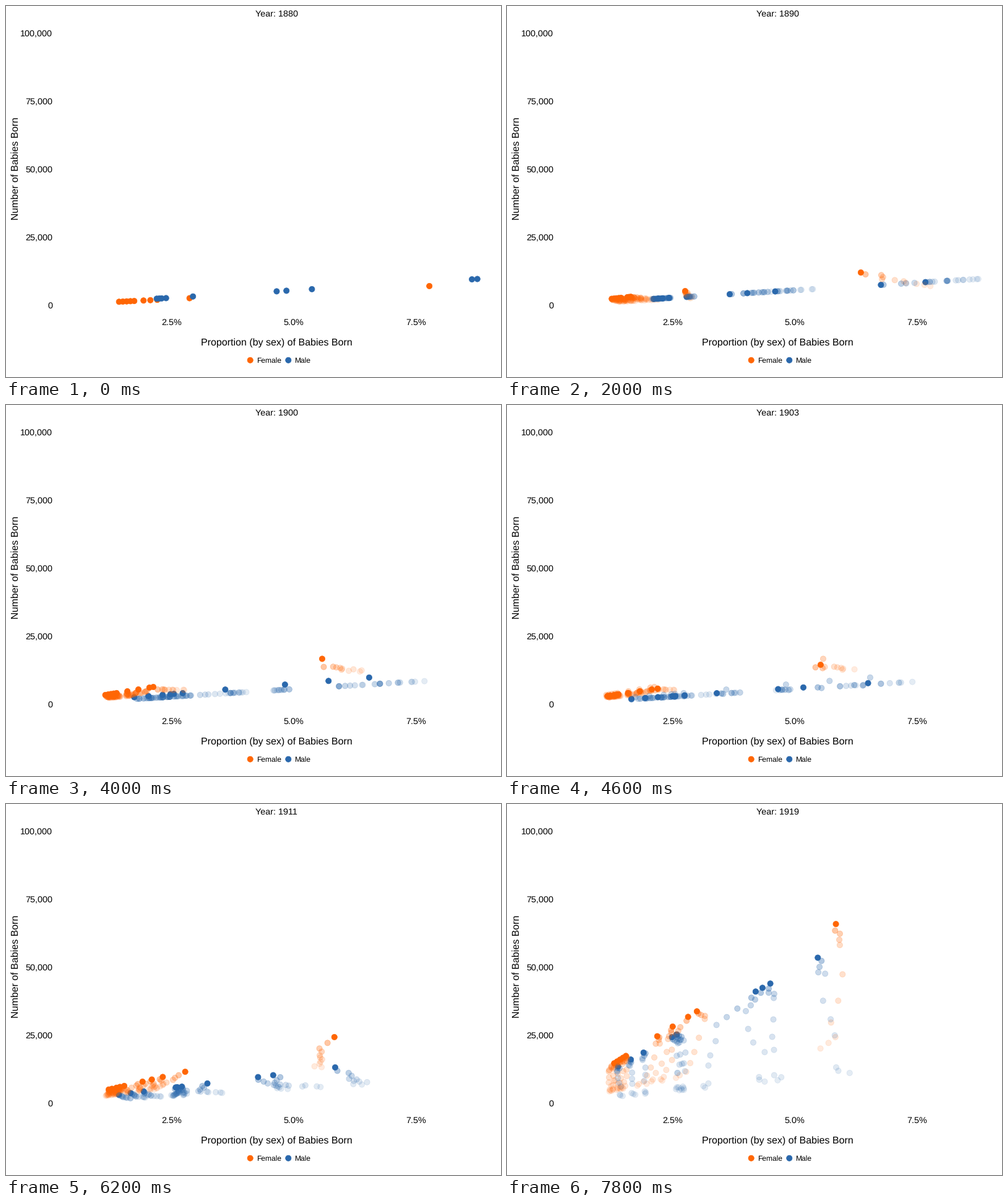
Animation, 800 px wide and 600 px high, one loop 8 s. Source, as a matplotlib script:

```python
import numpy as np
import matplotlib.pyplot as plt
from matplotlib.animation import FuncAnimation
from matplotlib.colors import to_rgb

plt.rcParams["font.family"] = "Liberation Sans"
plt.rcParams["text.hinting"] = "none"

START, COUNT, WAKE = 1880, 40, 10
YEARS = START + np.arange(COUNT)
KEYS = (1880, 1890, 1900, 1907, 1915, 1919)
ORANGE, BLUE = "#ff6604", "#2a68ac"


def births(*marks):
    """Births per year, growing exponentially between (year, thousands)."""
    x, y = zip(*marks)
    return 1000 * np.exp(np.interp(YEARS, x, np.log(y)))


def line(*shares):
    """Share in percent of one rank, given in the key years."""
    return np.interp(YEARS, KEYS, shares)


def band(n, top, low):
    """Shares of n ranks spread evenly between two lines."""
    return [top + (low - top) * k for k in np.linspace(0, 1, n)]


def tracks(total, shares, seed):
    """Positions of the ten ranks in every year, shape (years, 10, 2)."""
    share = np.stack(shares, axis=1)
    noise = np.random.default_rng(seed).normal(0, 0.012, share.shape)
    noise[np.isin(YEARS, KEYS)] = 0
    share = share * (1 + noise)
    count = share / 100 * total[:, None]
    return np.stack([70.4 + 79.1 * share, 484 - 0.0044 * count], axis=-1)


girls = tracks(
    births((1880, 91), (1890, 190), (1899, 245), (1900, 300), (1901, 239),
           (1907, 319), (1911, 418), (1915, 984), (1919, 1130)),
    [line(7.76, 6.34, 5.57, 5.52, 5.91, 5.83),
     line(2.86, 2.75, 2.12, 2.39, 3.15, 2.99),
     *band(3, line(2.20, 1.64, 2.04, 2.12, 2.57, 2.81),
           line(1.92, 1.57, 1.59, 1.57, 2.23, 2.18)),
     *band(5, line(1.73, 1.44, 1.37, 1.46, 1.56, 1.54),
           line(1.42, 1.25, 1.14, 1.22, 1.19, 1.30))], seed=3)

boys = tracks(
    births((1880, 110.5), (1890, 111), (1899, 112), (1900, 150.5),
           (1901, 108), (1907, 147), (1911, 226), (1912, 430),
           (1915, 849), (1919, 980)),
    [line(8.74, 7.66, 6.53, 6.12, 5.61, 5.46),
     line(8.63, 6.75, 5.70, 4.71, 4.56, 4.49),
     line(5.36, 4.59, 4.81, 4.58, 3.99, 4.33),
     line(4.84, 4.02, 3.59, 3.04, 3.39, 4.19),
     line(4.64, 3.66, 2.72, 2.75, 2.72, 2.58),
     *band(2, line(2.93, 2.78, 2.54, 2.65, 2.63, 2.57),
           line(2.38, 2.42, 2.47, 2.62, 2.60, 2.48)),
     *band(3, line(2.29, 2.29, 2.31, 2.01, 1.88, 1.90),
           line(2.19, 2.11, 1.73, 1.51, 1.36, 1.38))], seed=8)

points = np.concatenate([girls, boys], axis=1)
colors = np.array([to_rgb(ORANGE)] * 10 + [to_rgb(BLUE)] * 10)

fig = plt.figure(figsize=(800 / 72, 600 / 72), dpi=72, facecolor="white")
ax = fig.add_axes([0, 0, 1, 1])
ax.set(xlim=(0, 800), ylim=(600, 0))
ax.axis("off")


def label(x, y, text, size=14.4, ha="center", **kw):
    return ax.text(x, y, text, fontsize=size, ha=ha, va="baseline",
                   color="black", **kw)


title = label(437.3, 17.2, "")
for n in range(0, 100001, 25000):
    label(75.4, 489.2 - 0.0044 * n, f"{n:,}", ha="right")
for p in (2.5, 5.0, 7.5):
    label(69.8 + 79.1 * p, 516.2, f"{p}%")
label(437.3, 549, "Proportion (by sex) of Babies Born", 16)
label(19.8, 262.5, "Number of Babies Born", 16, rotation=90,
      rotation_mode="anchor")
label(405.2, 577.2, "Female", 12, "left")
label(466.4, 577.2, "Male", 12, "left")

DOT = dict(s=9.24 ** 2, linewidths=0.7)
ax.scatter([394.7, 456.3], [572.8, 572.8], c=[ORANGE, BLUE], **DOT)
dots = ax.scatter([], [], **DOT)


def update(i):
    # The fading wake lies on top of the current year
    order = [i] + list(range(max(0, i - WAKE), i))
    rgba = []
    for k in order:
        alpha = 1 if k == i else 0.09 + 0.27 * 0.8 ** (i - k - 1)
        rgba.append(np.column_stack([colors, np.full(len(colors), alpha)]))
    rgba = np.vstack(rgba)
    dots.set_offsets(points[order].reshape(-1, 2))
    dots.set_facecolors(rgba)
    dots.set_edgecolors(rgba)
    title.set_text(f"Year: {START + i}")
    return dots, title


anim = FuncAnimation(fig, update, frames=COUNT, interval=200,
                     init_func=lambda: update(0), repeat=True, repeat_delay=0)
plt.show()
```
